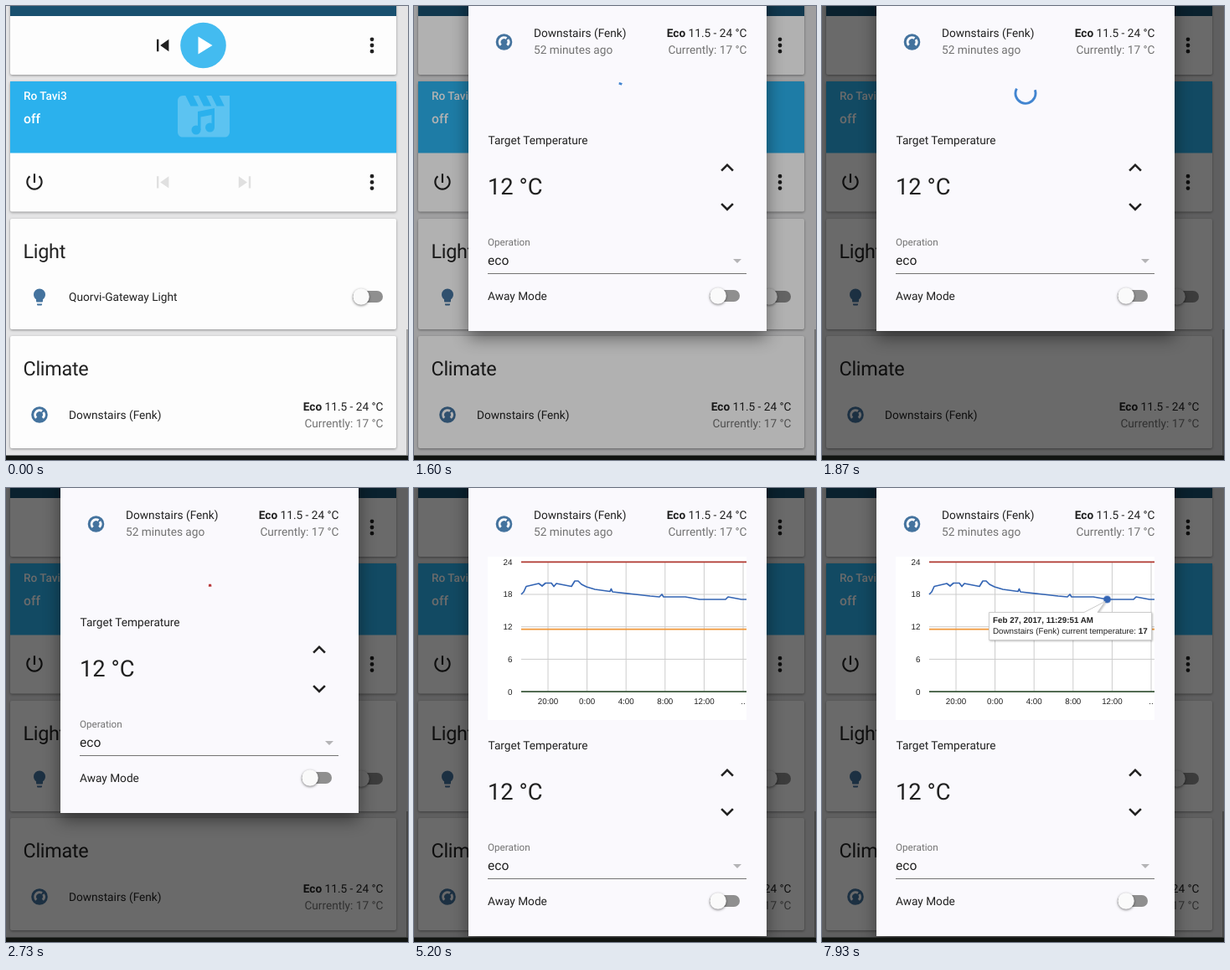
Animation, 480 px wide and 542 px high, one loop 8 s. Source, as an HTML page:

```html
<!DOCTYPE html>
<html lang="en">
<head>
<meta charset="utf-8">
<title>Home dashboard</title>
<style>
  html, body { margin: 0; width: 100%; height: 100%; overflow: hidden; background: #e4e4e5; }
  svg { display: block; width: 480px; height: 542px; font: 13.68px Roboto, sans-serif; fill: #212121; text-rendering: geometricPrecision; }
  .card { fill: #fdfdfd; filter: drop-shadow(0 1px 1.5px rgba(0, 0, 0, .38)); }
  .title { font-size: 23.4px; letter-spacing: -.012em; }
  .muted { fill: #727272; }
  .end { text-anchor: end; }
  .bold { font-weight: 700; }
  .white { fill: #fff; font-weight: 500; }
  .accent { fill: #44739e; }
  .off { fill: #e0e0e0; }
  .knob { fill: #fafafa; filter: drop-shadow(0 1px 1.5px rgba(0, 0, 0, .5)); }
  .sheet { fill: #faf9fd; filter: drop-shadow(0 8px 10px rgba(0, 0, 0, .45)); }
  .chart { font: 9.8px "Liberation Sans", Arial, sans-serif; }
  .line { fill: none; stroke-width: 1.7; stroke-linejoin: round; }
</style>
</head>
<body>
<svg viewBox="0 0 480 542">
  <defs>
    <path id="prev" d="M6 6h2v12H6zm3.5 6l8.5 6V6z"/>
    <path id="more" d="M12 8a2 2 0 1 0 0-4 2 2 0 0 0 0 4zm0 2a2 2 0 1 0 0 4 2 2 0 0 0 0-4zm0 6a2 2 0 1 0 0 4 2 2 0 0 0 0-4z"/>
    <path id="power" d="M13 3h-2v10h2V3zm4.83 2.17l-1.42 1.42C17.99 7.86 19 9.81 19 12c0 3.87-3.13 7-7 7s-7-3.13-7-7c0-2.19 1.01-4.14 2.58-5.42L6.17 5.17C4.23 6.82 3 9.26 3 12c0 4.97 4.03 9 9 9s9-4.03 9-9c0-2.74-1.23-5.18-3.17-6.83z"/>
    <path id="bulb" d="M12 2A7 7 0 0 0 5 9c0 2.38 1.19 4.47 3 5.74V17a1 1 0 0 0 1 1h6a1 1 0 0 0 1-1v-2.26c1.81-1.27 3-3.36 3-5.74a7 7 0 0 0-7-7M9 21a1 1 0 0 0 1 1h4a1 1 0 0 0 1-1v-1H9z"/>
    <path id="clapper" d="M18 4l2 4h-3l-2-4h-2l2 4h-3l-2-4H8l2 4H7L5 4H4c-1.1 0-2 .9-2 2v12c0 1.1.9 2 2 2h16c1.1 0 2-.9 2-2V4z"/>
    <path id="chevron" d="M12 8l-6 6 1.41 1.41L12 10.83l4.59 4.58L18 14z"/>
    <g id="gauge">
      <circle r="9.800"/>
      <path d="M-3.800 3.800A5.400 5.400 0 0 1 3 -4.500M4.500 -3A5.400 5.400 0 0 1 3.800 3.800" fill="none" stroke="#fbfbfd" stroke-width="2.900"/>
    </g>
    <g id="toggle">
      <rect x="-10" y="-7" width="36" height="14" rx="7" fill="#8f8f8f"/>
      <circle class="knob" r="9.800"/>
    </g>
    <g id="reading">
      <text class="end"><tspan class="bold">Eco</tspan> 11.5 - 24 °C</text>
      <text class="end muted" y="20">Currently: 17 °C</text>
    </g>
  </defs>

  <rect width="480" height="542" fill="#e4e4e5"/>
  <rect x="478" y="386" width="2" height="150" fill="#a5a5a5"/>

  <rect class="card" x="5" y="-10" width="461" height="92" rx="2"/>
  <rect x="5" width="461" height="12" fill="#19506f"/>
  <use href="#prev" transform="translate(172.8 32.6) scale(1.2)"/>
  <circle cx="235.500" cy="47" r="27.300" fill="#43bbf0"/>
  <path d="M229.500 36.500v21l17-10.500z" fill="#fff"/>
  <use href="#more" transform="translate(422.6 32.6) scale(1.2)"/>

  <rect class="card" x="5" y="90" width="461" height="155.500" rx="2"/>
  <rect x="5" y="90" width="461" height="85.500" fill="#2bb1ed"/>
  <use href="#clapper" transform="translate(198.8 94.6) scale(3.1)" fill="#fff" opacity=".23"/>
  <g fill="#2bb1ed">
    <circle cx="227" cy="148" r="5.500"/>
    <circle cx="243.500" cy="145" r="5.500"/>
    <path d="M229 126l20-4v23h-3.500v-15l-13 2.600v15.400h-3.500z"/>
  </g>
  <text class="white" x="21" y="112">Ro Tavi3</text>
  <text class="white" x="21" y="140" font-size="15.600">off</text>
  <use href="#power" transform="translate(21 197) scale(1.08)"/>
  <use class="off" href="#prev" transform="translate(172.800 196) scale(1.2)"/>
  <use class="off" href="#prev" transform="translate(299.400 196) scale(-1.2 1.2)"/>
  <use href="#more" transform="translate(422.600 196) scale(1.2)"/>

  <rect class="card" x="5" y="254" width="461" height="132" rx="2"/>
  <text class="title" x="20.500" y="300.500">Light</text>
  <use class="accent" href="#bulb" x="28" y="335.500"/>
  <text x="75" y="352">Quorvi-Gateway Light</text>
  <use href="#toggle" x="424" y="347"/>

  <rect class="card" x="5" y="394" width="461" height="134" rx="2"/>
  <text class="title" x="20.500" y="441">Climate</text>
  <use class="accent" href="#gauge" x="40" y="488"/>
  <text x="75" y="492.500">Downstairs (Fenk)</text>
  <use href="#reading" x="450.500" y="483"/>

  <rect id="backdrop" width="480" height="537" fill="#000"/>

  <g id="dialog">
    <rect id="sheet" class="sheet" x="65" y="-20" width="356" height="408"/>
    <use class="accent" href="#gauge" x="107.500" y="43"/>
    <text x="143" y="37">Downstairs (Fenk)</text>
    <text class="muted" x="143" y="57">52 minutes ago</text>
    <use href="#reading" x="397.500" y="37"/>

    <circle id="spinner" cx="243" cy="104.300" r="12" pathLength="360" fill="none" stroke-width="2.900"/>

    <g id="chart" class="chart">
      <rect x="88" y="82" width="309" height="195" fill="#fff"/>
      <g id="grid"></g>
      <path class="line" d="M128 88.300H397" stroke="#b23a32"/>
      <path class="line" d="M128 168.700H397" stroke="#f0973a"/>
      <path class="line" d="M128 243.200H397" stroke="#3d5a3d" stroke-width="1.400"/>
      <path class="line" stroke="#3465b4" d="M128 127l3-3 3-6.500 15-3.500 4 3 4-3.500h7l3 4 3-3.500 18 3.500 4-6.500h4l4 4 6 3 10 3 18 2.500 1.500-3 1.500 3.500 23 2.500 22 2.500 11 1 3-3 2 3h26l17 3h31l3-3 16 3h6"/>
      <g id="tooltip">
        <circle cx="340.500" cy="133" r="5" fill="#3465b4" opacity=".35"/>
        <circle cx="340.500" cy="133" r="4" fill="#3465b4"/>
        <path d="M199.500 148.500H313L338 135.500 329 148.500H393.500V181.500H199.500z" fill="#fff" stroke="#ccc"
          style="filter:drop-shadow(1px 1px 1px rgba(0,0,0,.25))"/>
        <text class="bold" x="204" y="161">Feb 27, 2017, 11:29:51 AM</text>
        <text x="204" y="174">Downstairs (Fenk) current temperature: <tspan class="bold">17</tspan></text>
      </g>
    </g>

    <g id="controls">
      <text x="88.500" y="165">Target Temperature</text>
      <text x="88" y="225" font-size="27.300">12 °C</text>
      <use href="#chevron" transform="translate(358.400 177.500) scale(1.3)"/>
      <use href="#chevron" transform="translate(358.400 255.200) scale(1.3 -1.3)"/>
      <text class="muted" x="88" y="285.500" font-size="11.700">Operation</text>
      <text x="88" y="309" font-size="15.600">eco</text>
      <path d="M381 302h10l-5 5z" fill="#b4b4b6"/>
      <rect x="88" y="319" width="309" height="1" fill="#737373"/>
      <text x="88" y="351">Away Mode</text>
      <use href="#toggle" x="363" y="346"/>
    </g>
  </g>
  <rect y="536.500" width="480" height="6" fill="#111411"/>
</svg>
<script>
const LOOP = 8000, OPEN = 1600, LOADED = 5070, HOVER = 6270;
const CYCLE = 1160, SPIN_START = 1568;
const COLORS = ['#4285d0', '#b8383a', '#dca03c', '#0f9d58'];
const $ = id => document.getElementById(id);
const show = (id, on) => $(id).setAttribute('visibility', on ? 'inherit' : 'hidden');

function buildGrid() {
  let out = '';
  for (let i = 0; i < 5; i++) {
    const y = 88.3 + i * 38.7;
    out += `<path d="M128 ${y}H397" stroke="#ccc"/>
      <text class="end" x="117.500" y="${y + 3.4}">${24 - i * 6}</text>`;
  }
  ['20:00', '0:00', '4:00', '8:00', '12:00', '..'].forEach((label, i) => {
    const x = 160 + i * 46.6;
    out += `<path d="M${x} 88V243" stroke="#ccc"/>
      <text x="${x}" y="258" text-anchor="middle">${label}</text>`;
  });
  $('grid').innerHTML = out;
}

// Solves cubic-bezier(.4, 0, .2, 1) by bisection.
function ease(x) {
  let lo = 0, hi = 1, s = .5;
  for (let i = 0; i < 18; i++) {
    s = (lo + hi) / 2;
    const q = 1 - s;
    if (1.2 * q * q * s + .6 * q * s * s + s ** 3 < x) lo = s; else hi = s;
  }
  return 3 * (1 - s) * s * s + s ** 3;
}

function drawSpinner(t) {
  const halves = (t - SPIN_START) / (CYCLE / 2);
  const step = Math.floor(halves), e = ease(halves - step);
  const sweep = 16 + 264 * (step % 2 ? 1 - e : e);
  const drift = t - 2730;
  const angle = -93 + drift * (drift < 0 ? .2222 : .2024) + 135 * (step + e);
  const arc = $('spinner');
  arc.setAttribute('stroke', COLORS[Math.min(3, step >> 1)]);
  arc.setAttribute('stroke-dasharray', `${sweep} ${360 - sweep}`);
  arc.setAttribute('transform', `rotate(${angle - 90 - sweep / 2} 243 104.3)`);
}

function render(t) {
  const loaded = t >= LOADED, open = t >= OPEN;
  show('dialog', open);
  show('chart', loaded);
  show('tooltip', t >= HOVER);
  show('spinner', open && !loaded);
  $('backdrop').setAttribute('opacity', open ? Math.min(.58, .3 + (t - OPEN) * .0026) : 0);
  $('sheet').setAttribute('height', loaded ? 555 : 408);
  $('controls').setAttribute('transform', `translate(0 ${loaded ? 147 : 0})`);
  if (open && !loaded) drawSpinner(t);
}

function tick() {
  render(performance.now() % LOOP);
  requestAnimationFrame(tick);
}
buildGrid();
tick();
</script>
</body>
</html>
```
